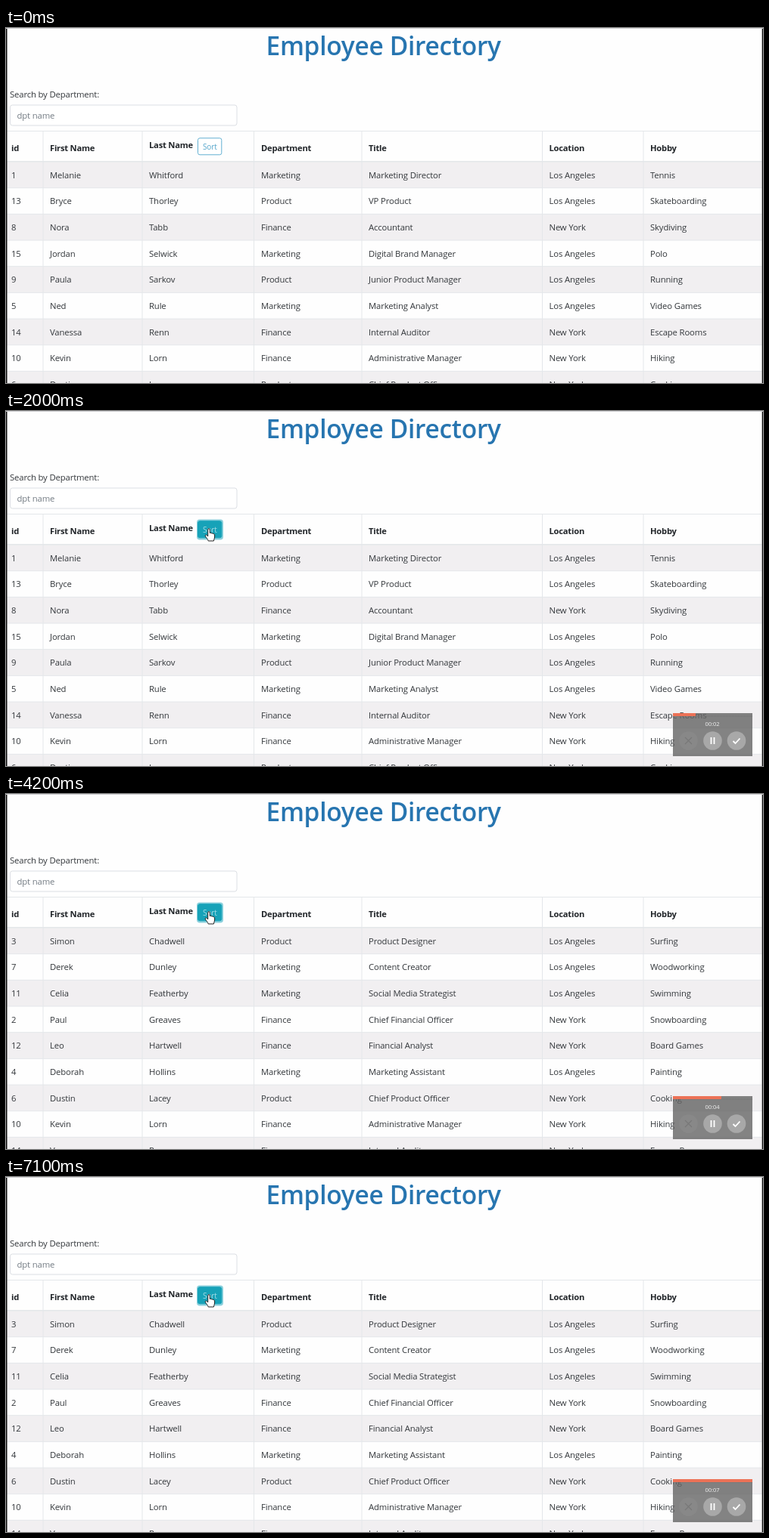
Recreate the animation shown at these times as an HTML page. Size 1000 by 470 pixels, loop 7.2 s.

```html
<!DOCTYPE html>
<html lang="en">
<head>
<meta charset="utf-8">
<title>Employee Directory</title>
<style>
  html, body { margin: 0; width: 100%; height: 100%; overflow: hidden; background: #fefefe; }
  svg { display: block; width: 1000px; height: 470px; }
  text { font: 11.3px "Open Sans", "Noto Sans", sans-serif; letter-spacing: -.012em; fill: #33373b; }
  .title { font-size: 33.5px; font-weight: 600; letter-spacing: -.009em; fill: #2775b0; }
  .head { font-size: 11.2px; font-weight: 700; letter-spacing: -.02em; fill: #212529; }
  .hint { fill: #747c84; }
  .sort { font-size: 10px; fill: #55a6cb; }
  .clock { font-size: 7.6px; fill: #f0f0f0; text-anchor: middle; }
  .line { fill: none; stroke: #e4e7ea; }
  .icon { fill: none; stroke: #fff; stroke-width: 1.8; }
</style>
</head>
<body>
<svg viewBox="0 0 1000 470">
  <text class="title" x="343.5" y="36">Employee Directory</text>
  <text x="5" y="92">Search by Department:</text>
  <rect x="5.5" y="102" width="299.5" height="27" rx="3" fill="#fff" stroke="#dcdfe4"/>
  <text class="hint" x="14.5" y="120.3">dpt name</text>
  <g id="stripes"></g>
  <g id="grid"></g>
  <g id="down"></g>
  <g id="up"></g>
  <rect id="ring" x="252" y="143.5" width="35" height="27" rx="4" fill="#8bd0dc"/>
  <rect id="button" x="253.5" y="145.8" width="31.3" height="22" rx="2.5"/>
  <text id="label" class="sort" x="260" y="160.6">Sort</text>

  <g id="recorder">
    <rect x="881" y="400" width="105" height="57" fill="#646464" fill-opacity=".8"/>
    <path d="M881 404H986" stroke="#6c6c6c" stroke-dasharray="1 1"/>
    <rect id="bar" x="881" y="400" height="4" fill="#ec7257"/>
    <text id="clock" class="clock" x="933" y="417.2"></text>
    <circle cx="901.5" cy="436.5" r="12.3" fill="#888"/>
    <circle cx="933.5" cy="436.5" r="12.3" fill="#a8a8a8"/>
    <circle cx="965" cy="436.5" r="12.3" fill="#a8a8a8"/>
    <path class="icon" style="stroke:#787878;stroke-width:1.2" d="M897 432l9 9m0-9l-9 9"/>
    <path class="icon" d="M931.5 432v9m4-9v9M960.5 437l3 3 6-6.5"/>
  </g>

  <path d="M0 0H1.5V470H0zM998.7 0H1000V470H998.7z" fill="#111"/>
  <path d="M0 .5H1000" stroke="#d2d2d4"/>
  <path id="arrow" d="M0 0V11.5L2.6 9.2 4.4 13 6.3 12.1 4.6 8.5H8z" fill="#fff" stroke="#222"/>
  <path id="hand" d="M-1.3 0c0-1.8 2.6-1.8 2.6 0V4.5c1-.6 2.2-.2 2.4.6 1-.5 2-.1 2.2.7 1-.3 1.7.2 1.7 1.2V10c0 2-1.2 3-1.2 5H-.8C-1 13-3.8 10.8-4.6 8.7c-.6-1.6 1-2.3 2-1.2l1.3 1.4z" fill="#fff" stroke="#222"/>
</svg>
<script>
const $ = id => document.getElementById(id);
const TOP = 177, ROW = 34.67;
const textX = [7, 58, 189, 337, 479, 717.5, 851];
const heads = ["id", "First Name", "Last Name", "Department", "Title", "Location", "Hobby"];
const staff = `1,Melanie,Whitford,Marketing,Marketing Director,Los Angeles,Tennis
13,Bryce,Thorley,Product,VP Product,Los Angeles,Skateboarding
8,Nora,Tabb,Finance,Accountant,New York,Skydiving
15,Jordan,Selwick,Marketing,Digital Brand Manager,Los Angeles,Polo
9,Paula,Sarkov,Product,Junior Product Manager,Los Angeles,Running
5,Ned,Rule,Marketing,Marketing Analyst,Los Angeles,Video Games
14,Vanessa,Renn,Finance,Internal Auditor,New York,Escape Rooms
10,Kevin,Lorn,Finance,Administrative Manager,New York,Hiking
6,Dustin,Lacey,Product,Chief Product Officer,New York,Cooking
4,Deborah,Hollins,Marketing,Marketing Assistant,Los Angeles,Painting
12,Leo,Hartwell,Finance,Financial Analyst,New York,Board Games
2,Paul,Greaves,Finance,Chief Financial Officer,New York,Snowboarding
11,Celia,Featherby,Marketing,Social Media Strategist,Los Angeles,Swimming
7,Derek,Dunley,Marketing,Content Creator,Los Angeles,Woodworking
3,Simon,Chadwell,Product,Product Designer,Los Angeles,Surfing`.split("\n").map(s => s.split(","));

const cells = (row, y) => row.map((s, i) => `<text x="${textX[i]}" y="${y}">${s}</text>`).join("");
const body = list => list.slice(0, 9).map((r, i) => cells(r, TOP + 21.8 + i * ROW)).join("");

$("down").innerHTML = body(staff);
$("up").innerHTML = body([...staff].reverse());

let grid = "M1.5 136.5H998.5";
for (const x of [49, 180, 327.5, 470, 708.5, 842]) grid += `M${x} 137V470`;
for (let i = 0; i < 9; i++) {
  const y = TOP + i * ROW;
  if (i) grid += `M1.5 ${y}H998.5`;
  $("stripes").innerHTML += `<rect x="1.5" y="${y}" width="997" height="${ROW}"/>`;
}
$("grid").innerHTML = `<path class="line" d="${grid}"/>
  <path class="line" stroke-width="1.6" d="M1.5 176.7H998.5"/>`
  + heads.map((s, i) => `<text class="head" x="${textX[i]}" y="${i == 2 ? 159.3 : 163.3}">${s}</text>`).join("");

// Linear interpolation through [time, value] keys
function along(keys, t) {
  if (t <= keys[0][0]) return keys[0][1];
  for (let i = 1; i < keys.length; i++) {
    const [t0, a] = keys[i - 1], [t1, b] = keys[i];
    if (t <= t1) return a + (b - a) * (t - t0) / (t1 - t0);
  }
  return keys[keys.length - 1][1];
}
const mouseX = [[100, 640], [800, 330], [900, 292], [1200, 268]];
const mouseY = [[100, 420], [800, 190], [900, 156], [1200, 157]];
const barEnd = [[200, 881], [900, 889], [2000, 911], [3300, 930], [4200, 945],
  [5600, 966], [7100, 986]];
const clicks = [1800, 2000, 3700, 4600, 5300, 5800, 6200];
const show = (id, on) => $(id).style.display = on ? "" : "none";

function draw(t) {
  const x = along(mouseX, t), y = along(mouseY, t);
  const over = t >= 1100, sorted = clicks.filter(c => c <= t).length % 2;
  show("up", sorted);
  show("down", !sorted);
  show("recorder", t >= 200);
  show("ring", t >= 1700);
  show("arrow", t >= 100 && !over);
  show("hand", over);
  $("arrow").setAttribute("transform", `translate(${x} ${y})`);
  $("hand").setAttribute("transform", `translate(${x} ${y})`);
  $("button").setAttribute("fill", over ? "#17a2b8" : "#fff");
  $("button").setAttribute("stroke", over ? "#17a2b8" : "#62b0d2");
  $("label").style.fill = over ? "#a5dce6" : "";
  $("bar").setAttribute("width", along(barEnd, t) - 881);
  $("clock").textContent = "00:0" + Math.floor(t / 1000);

  // row highlight trails the pointer by one step
  const hot = t < 200 ? -1 : Math.floor((along(mouseY, t - 100) - TOP) / ROW);
  [...$("stripes").children].forEach((r, i) =>
    r.setAttribute("fill", i == hot ? "#ebebeb" : i % 2 ? "#fefefe" : "#f1eff1"));
}
function tick() {
  draw(Math.floor(performance.now() % 7200 / 100) * 100);
  requestAnimationFrame(tick);
}
tick();
</script>
</body>
</html>
```
